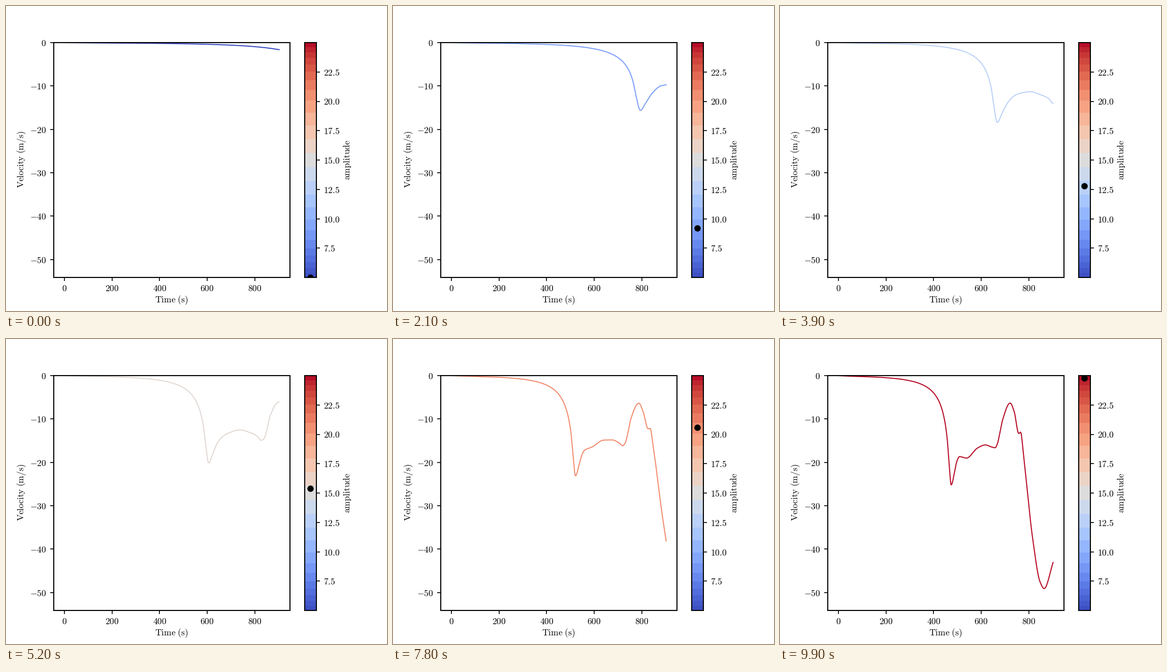
A matplotlib script for the animation above (10 s loop, 750 by 600 pixels).

```python
import numpy as np
import matplotlib.pyplot as plt
from matplotlib.animation import FuncAnimation

W, H, DPI = 750, 600, 150
FRAMES, INTERVAL = 100, 100
A_MIN, A_MAX, A_LAST = 5, 25, 24.8
T_END, V_MIN = 902.2, -54.15
SIZE = 8.4

plt.rcParams.update({"mathtext.fontset": "cm", "font.size": SIZE,
                     "axes.linewidth": 1})

# Speeds scale with sqrt(A) and times with 1 / sqrt(A), so one curve in
# scaled units serves all amplitudes; it drifts slowly with 1 / A.
DIP = 2361
TIMES = np.linspace(0, T_END, 700)

# After the dip: scaled delay, scaled speed at high and at low amplitude
TURNS = np.array([
    (0, 5.06, 5.16), (75, 4.40, 4.65), (117, 3.98, 4.32), (175, 3.75, 3.88),
    (319, 3.82, 3.26), (552, 3.35, 3.13), (712, 3.21, 3.38),
    (852, 3.31, 3.66), (919, 3.34, 4.00), (967, 3.15, 3.95),
    (1020, 2.63, 3.45), (1073, 2.07, 2.55), (1233, 1.27, 1.66),
    (1318, 1.67, 2.20), (1413, 2.68, 2.75), (1451, 2.62, 2.80),
    (1520, 3.84, 3.60), (1701, 7.49, 7.00), (1860, 9.56, 10.3),
    (1945, 9.86, 12.0), (2132, 8.65, 10.0)])


def smooth(x, y, xs):
    """Monotone cubic interpolation."""
    h = np.diff(x)
    d = np.diff(y) / h
    m = np.zeros(len(x))
    m[0], m[-1] = d[0], d[-1]
    same = d[:-1] * d[1:] > 0
    a, b = d[:-1][same], d[1:][same]
    wa = (2 * h[1:] + h[:-1])[same]
    wb = (h[1:] + 2 * h[:-1])[same]
    m[1:-1][same] = (wa + wb) / (wa / a + wb / b)
    i = np.clip(np.searchsorted(x, xs, side="right") - 1, 0, len(h) - 1)
    s = (xs - x[i]) / h[i]
    return (y[i] * (1 + 2 * s) * (1 - s) ** 2 + y[i + 1] * s * s * (3 - 2 * s)
            + h[i] * s * (1 - s) * (m[i] * (1 - s) - m[i + 1] * s))


def velocity(amp):
    root, lag = np.sqrt(amp), 1 / amp - 1 / A_LAST
    # slow fall that steepens towards the dip
    u = np.linspace(0, DIP - 45, 60)
    left = DIP - u
    fall = 497 / (left + 73) * np.exp(-left / 1080) * np.tanh(u / 200)
    u = u + 540 * lag * np.tanh(fall)
    # swings after it, a little earlier at low amplitude
    delay, high, low = TURNS.T
    mix = 1 - np.exp(-lag / .02)
    u = np.append(u, DIP + 700 * lag + delay * (1 - 2.4 * lag))
    speed = np.append(fall, high + mix * (low - high))
    return -root * smooth(u, speed, TIMES * root)


def rm(text):
    return r"$\mathrm{%s}$" % text.replace(" ", r"\ ")


def label(x, y, text, size=SIZE, rotation=0):
    fig.text(x / W, 1 - y / H, rm(text), size=size, rotation=rotation,
             ha="center", va="center")


fig = plt.figure(figsize=(W / DPI, H / DPI), dpi=DPI, facecolor="white")
ax = fig.add_axes([.125, .11, .62, .77])
ax.set_xlim(-.05 * T_END, 1.05 * T_END)
ax.set_ylim(V_MIN, 0)
xt, yt = range(0, 801, 200), range(0, -51, -10)
ax.set_xticks(xt, [rm(str(x)) for x in xt])
ax.set_yticks(yt, [rm(str(y)) for y in yt])
ax.tick_params(axis="x", pad=2.6)
label(326.3, 578.5, "Time (s)")
label(31, 302, "Velocity (m/s)", rotation=90)

# Colour scale: bands narrow at the ends and wide in the middle
cmap = plt.get_cmap("coolwarm")
cax = fig.add_axes([.78375, .11, .0308, .77])
s = np.linspace(0, 1, 26)
edges = A_MIN + (A_MAX - A_MIN) * (s - .08 * np.sin(2 * np.pi * s))
mids = (edges[1:] + edges[:-1]) / 2
cax.pcolormesh([0, 1], edges, mids[:, None], cmap=cmap, vmin=A_MIN, vmax=A_MAX)
cax.set_xlim(0, 1)
cax.set_ylim(A_MIN, A_MAX)
cax.set_xticks([])
cax.yaxis.tick_right()
ct = np.arange(7.5, 23, 2.5)
cax.set_yticks(ct, [rm(f"{c:.1f}") for c in ct])
label(672.5, 302.5, "amplitude", size=8.5, rotation=90)

curve, = ax.plot([], [], lw=1)
dot, = cax.plot([], [], "ko", ms=5, mew=1, zorder=3)


def draw(n):
    amp = A_MIN + n * (A_MAX - A_MIN) / FRAMES
    curve.set_data(TIMES, velocity(amp))
    curve.set_color(cmap((amp - A_MIN) / (A_MAX - A_MIN)))
    dot.set_data([.5], [amp])
    return curve, dot


anim = FuncAnimation(fig, draw, frames=FRAMES, interval=INTERVAL,
                     repeat=True, repeat_delay=0)
plt.show()
```
